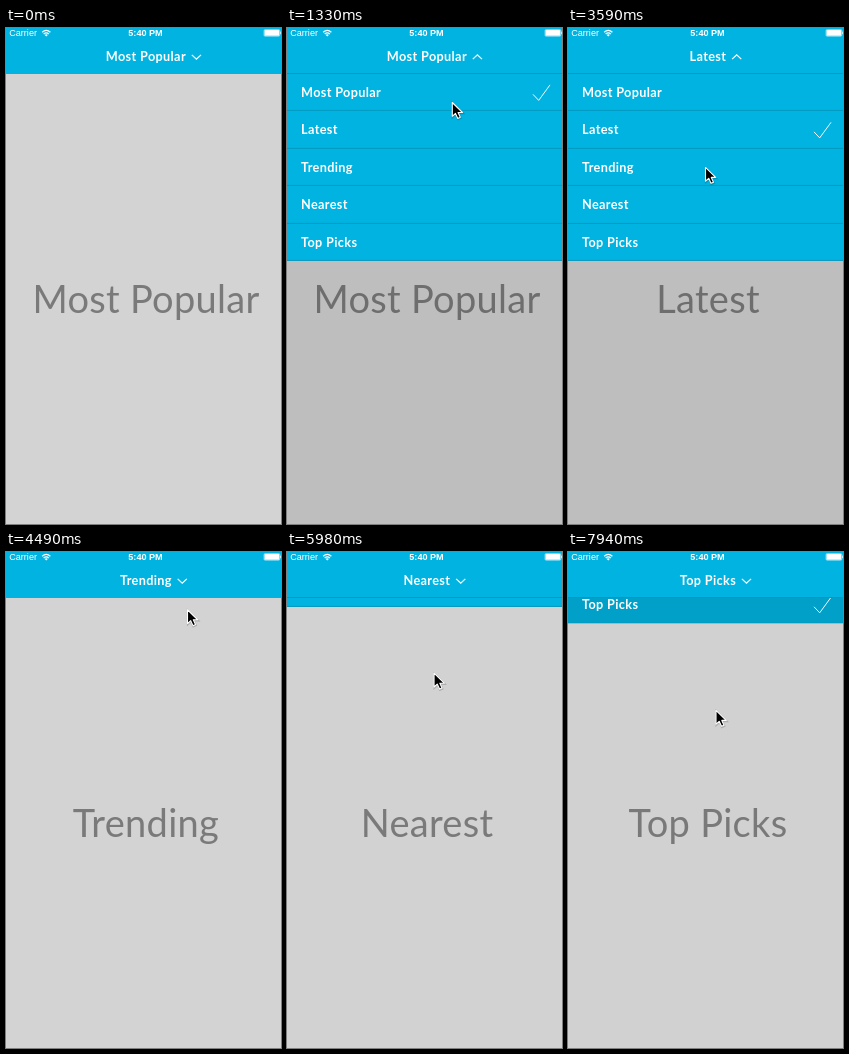
Write an HTML page that moves like this. It is 275 px wide and 496 px high and loops after 8 s.

```html
<!DOCTYPE html>
<html lang="en">
<head>
<meta charset="utf-8">
<title>Dropdown menu</title>
<style>
  html, body { margin: 0; width: 100%; height: 100%; overflow: hidden; background: #d3d3d3; }
  svg { display: block; width: 100%; height: 100%; }
  text { fill: #fff; }
  .label { font: 700 12.7px Lato, sans-serif; letter-spacing: 0.35px; }
  .status { font: 9.1px "Liberation Sans", Arial, sans-serif; }
  .clock { font-weight: 700; }
  .big { font: 38px Lato, sans-serif; letter-spacing: 0.3px; fill: #7a7a7a; }
  .mid { text-anchor: middle; }
  .bar { fill: #00b3e0; }
  .rule { fill: #0099bf; }
  .line { fill: none; stroke: #fff; }
</style>
</head>
<body>
<svg viewBox="0 0 275 496">
  <defs>
    <clipPath id="below"><rect y="45" width="275" height="451"/></clipPath>
  </defs>
  <rect width="275" height="496" fill="#d3d3d3"/>
  <text id="big" class="big mid" x="140" y="284.5"></text>
  <rect id="mask" y="45" width="275" height="451"/>

  <rect class="bar" width="275" height="46"/>
  <g clip-path="url(#below)">
    <g id="panel">
      <rect class="bar" y="-250" width="275" height="437.5"/>
      <rect id="highlight" width="275" height="37.5" fill="#00a0c8"/>
      <g id="rows"></g>
      <path id="check" class="line" d="M246 21.5l5.7 6L263 12" stroke-width="0.95"/>
    </g>
  </g>
  <rect id="topRule" class="rule" y="45" width="275" height="1"/>

  <text class="status" x="3.2" y="8.4">Carrier</text>
  <g class="line" stroke-width="1.3">
    <path d="M36.2 4.2Q40.2 0.6 44.4 4.2M37.7 6Q40.3 3.8 42.9 6"/>
  </g>
  <path d="M38.7 6.9Q40.3 5.7 41.9 6.9L40.3 8.6z" fill="#fff"/>
  <text class="status clock mid" x="139.5" y="8.2">5:40 PM</text>
  <rect class="line" x="258" y="1.5" width="15.8" height="6.8" rx="1.2" stroke-width="0.8" opacity="0.6"/>
  <rect x="258.5" y="2" width="14.8" height="5.8" rx="0.6" fill="#fff"/>
  <rect x="274.3" y="3.6" width="0.7" height="2.6" fill="#fff"/>

  <text id="title" class="label mid" x="139.9" y="33"></text>
  <path id="arrow" class="line" d="M-4.6 -2.1L0 2.2L4.6 -2.1" stroke-width="1.25"/>

  <g id="cursor">
    <path d="M1 1.4V15.2L4.2 12.3L6.5 17.3L9 16.2L6.8 11.4H11.2z"
          transform="translate(.4 .8)" fill="#000" stroke="#000" stroke-width="2" opacity=".16"/>
    <path d="M1 1.4V15.2L4.2 12.3L6.5 17.3L9 16.2L6.8 11.4H11.2z"
          fill="#000" stroke="#fff" stroke-width="1.1" stroke-linejoin="round"/>
  </g>
</svg>
<script>
const LOOP = 8000, LAST = 7940;
const BAR = 45, ROW = 37.5, BOUNCE = 73, CLOSE_MS = 385, TURN_MS = 300;
const items = ["Most Popular", "Latest", "Trending", "Nearest", "Top Picks"];
const HEIGHT = ROW * items.length;
const opens = [670, 2940, 4870, 6670];
const picks = [1850, 3710, 5640, 7630];

// time, x, y of the pointer's top left corner
const pointer = [
  [180, 239, 50], [520, 168, 28], [930, 168, 28], [1330, 164.3, 73], [1470, 150, 86],
  [1610, 137, 98], [1980, 137, 98], [2390, 211.5, 88], [2650, 170, 39], [2790, 166, 34],
  [3130, 166, 34], [3570, 136.5, 138], [3950, 136.5, 138], [4490, 180.5, 56.5],
  [4580, 172, 41], [4720, 168, 34], [5060, 168, 34], [5520, 140, 176], [5760, 140, 176],
  [5980, 146, 120], [6470, 168, 34], [6860, 168, 34], [7430, 140, 212],
  [7690, 140, 212], [7940, 147, 157]
];

const $ = id => document.getElementById(id);
const clamp = v => Math.max(0, Math.min(1, v));
const smooth = v => { v = clamp(v); return v * v * (3 - 2 * v); };

function spring(ms) {
  const ratio = 0.76, decay = 11.5, freq = decay / ratio * Math.sqrt(1 - ratio * ratio);
  const s = Math.max(0, ms) / 1000;
  return 1 - Math.exp(-decay * s) * (Math.cos(freq * s) + decay / freq * Math.sin(freq * s));
}

function slope(i, axis) {
  const a = pointer[i], b = pointer[i + 1];
  return a && b ? (b[axis] - a[axis]) / (b[0] - a[0]) : 0;
}

// Harmonic mean of the neighbouring slopes: no overshoot, full stop at pauses
function tangent(i, axis) {
  const a = slope(i - 1, axis), b = slope(i, axis);
  return a * b > 0 ? 2 * a * b / (a + b) : 0;
}

function pointerAt(t, axis) {
  let i = 0;
  while (i < pointer.length - 2 && pointer[i + 1][0] <= t) i++;
  const [p, q] = [pointer[i], pointer[i + 1]];
  const span = q[0] - p[0], u = clamp((t - p[0]) / span), e = smooth(u);
  return p[axis] * (1 - e) + q[axis] * e
    + span * u * (1 - u) * ((1 - u) * tangent(i, axis) - u * tangent(i + 1, axis));
}

$("rows").innerHTML = items.map((name, i) =>
  `<text class="label" x="14" y="${i * ROW + 23.8}">${name}</text>
   <rect class="rule" y="${Math.floor((i + 1) * ROW)}" width="275" height="1"/>`).join("");

function menuAt(t, opened, picked) {
  if (opened > picked) {
    const s = spring(t - opened);
    return { drop: HEIGHT * s, dim: clamp(s), turn: smooth((t - opened) / TURN_MS), visible: true };
  }
  const u = (t - picked) / CLOSE_MS, left = 1 - smooth(u);
  const lift = BOUNCE * (1 - Math.min(1, spring(t - picked)));
  return {
    drop: (HEIGHT + BOUNCE) * left - lift,
    dim: left,
    turn: 1 - smooth((t - picked) / TURN_MS),
    visible: u < 1
  };
}

let shown = -1, arrowX = 0;
function setItem(index) {
  if (index === shown) return;
  shown = index;
  $("title").textContent = $("big").textContent = items[index];
  arrowX = 139.5 + $("title").getComputedTextLength() / 2 + 10.8;
  $("check").setAttribute("transform", `translate(0 ${index * ROW})`);
  $("highlight").setAttribute("y", index * ROW);
}

const latest = (times, t) => Math.max(-1e6, ...times.filter(v => v <= t));
const show = (id, on) => $(id).setAttribute("visibility", on ? "visible" : "hidden");

function draw(now) {
  const t = Math.min(now % LOOP, LAST);
  const opened = latest(opens, t), picked = latest(picks, t);
  const menu = menuAt(t, opened, picked);
  setItem(picks.filter(v => v <= t).length);

  show("panel", menu.visible);
  show("topRule", menu.visible);
  $("highlight").setAttribute("opacity", opened > picked ? 0 : 1);
  $("panel").setAttribute("transform", `translate(0 ${BAR + menu.drop - HEIGHT})`);
  $("mask").setAttribute("opacity", 0.1 * menu.dim);
  $("arrow").setAttribute("transform", `translate(${arrowX} 29) rotate(${180 * menu.turn})`);
  show("cursor", t >= pointer[0][0]);
  $("cursor").setAttribute("transform", `translate(${pointerAt(t, 1)} ${pointerAt(t, 2)})`);
}

const start = performance.now();
function tick() {
  draw(performance.now() - start);
  requestAnimationFrame(tick);
}
tick();
</script>
</body>
</html>
```
